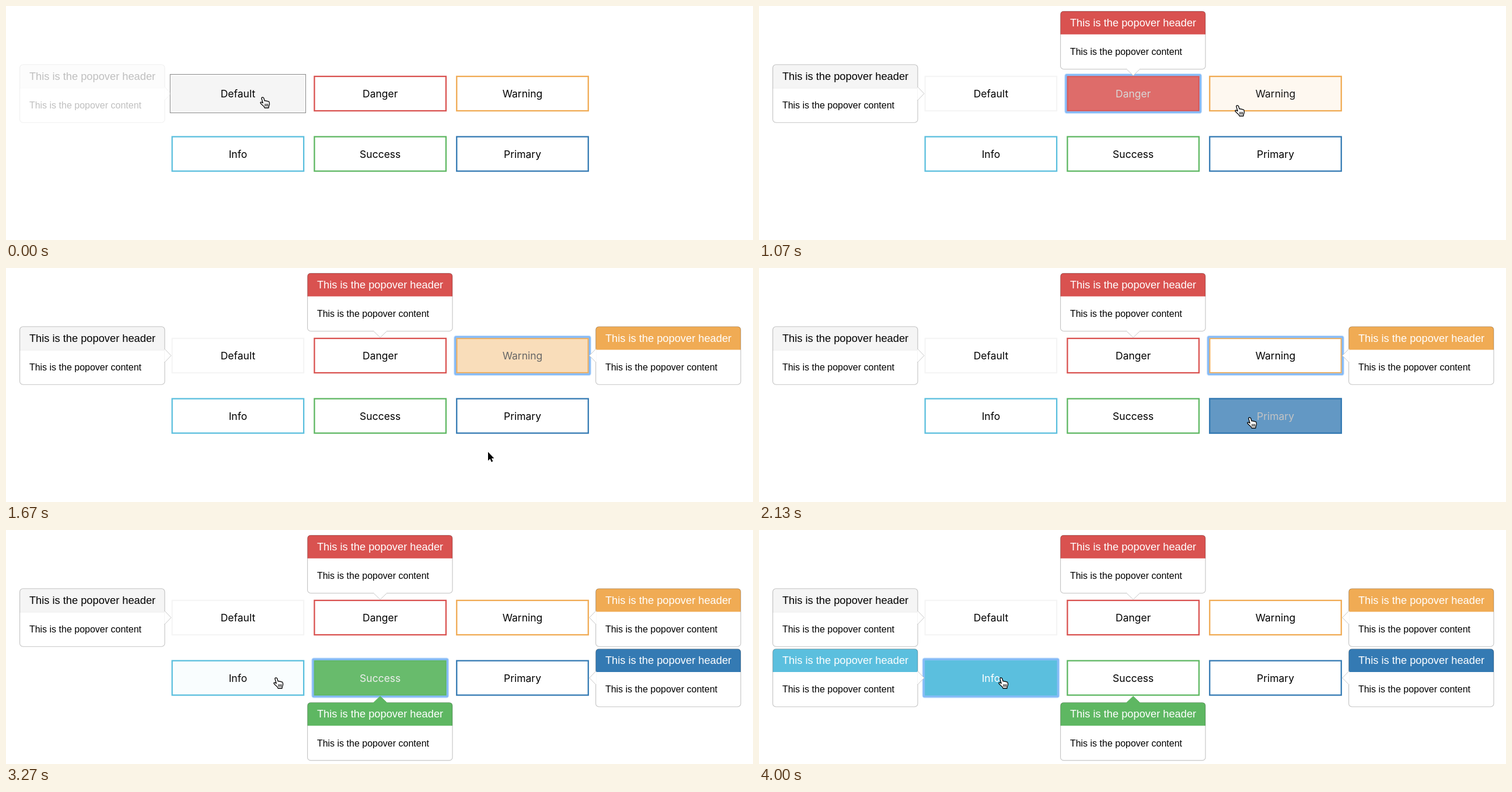
An HTML page that plays this animation: 1280x402 px, repeating every 4740 ms.

```html
<!DOCTYPE html>
<html lang="en">
<head>
<meta charset="utf-8">
<title>Popovers</title>
<style>
  html, body { margin: 0; width: 100%; height: 100%; overflow: hidden; background: #fff; }
  svg { display: block; width: 100%; height: 100%; }
  .label { font: 17.5px Inter, sans-serif; text-anchor: middle; }
  .head { font: 18.28px "Liberation Sans", Arial, sans-serif; }
  .body { font: 16px "Liberation Sans", Arial, sans-serif; }
</style>
</head>
<body>
<svg id="stage" viewBox="0 0 1280 402"></svg>
<script>
const LOOP = 4740, STEP = 1000 / 15, LAST_STEP = 60;
const W = 227.8, H = 61.4;      // button size
const PW = 248.4, PH = 99.4;    // popover size
const FADE = 7.5, POP_FADE = 2.25;

// Times are in steps: pointer enters, clicks, leaves. Listed in click order.
const buttons = [
  { name: 'Default', color: '#f5f5f5', col: 0, row: 0, side: 'left',   enter: -20,  click: -.56, leave: 3.7 },
  { name: 'Danger',  color: '#d95250', col: 1, row: 0, side: 'top',    enter: 4,    click: 10.5, leave: 15 },
  { name: 'Warning', color: '#f0ab54', col: 2, row: 0, side: 'right',  enter: 15.3, click: 19,   leave: 22.4 },
  { name: 'Primary', color: '#347ab3', col: 2, row: 1, side: 'right',  enter: 28.5, click: 34,   leave: 40.3 },
  { name: 'Success', color: '#5eb762', col: 1, row: 1, side: 'bottom', enter: 40.5, click: 43.5, leave: 48.4 },
  { name: 'Info',    color: '#5bbfde', col: 0, row: 1, side: 'left',   enter: 48.6, click: 52.5, leave: 99 }
];

// Pointer hot spot: step, x, y
const path = [
  [0, 440, 156], [2, 446, 156], [3.7, 511, 157], [4, 527, 157], [7, 596, 158], [9, 628, 159],
  [13.5, 640, 161], [15, 755, 166], [16, 820, 170], [18, 836, 160], [21, 834, 163],
  [22.4, 828, 181], [24, 826, 316], [26.5, 826, 316], [28.5, 832, 284], [31, 841, 256],
  [39, 841, 256], [40, 796, 258], [41, 665, 260], [42.5, 646, 261], [47, 644, 259],
  [48, 571, 255], [49, 463, 253], [51, 422, 253], [53, 415, 253], [60, 415, 253]
];

const clamp = v => Math.min(1, Math.max(0, v));

// CSS "ease": cubic-bezier(.25, .1, .25, 1)
function ease(x) {
  x = clamp(x);
  const bezier = (u, a, b) => 3 * u * (1 - u) * ((1 - u) * a + u * b) + u ** 3;
  let lo = 0, hi = 1;
  for (let i = 0; i < 20; i++) {
    const mid = (lo + hi) / 2;
    if (bezier(mid, .25, .25) < x) lo = mid; else hi = mid;
  }
  return bezier(lo, .1, 1);
}

function buttonMarkup({ x, y, name, color }) {
  return `<g class="button">
    <rect class="fill" x="${x}" y="${y}" width="${W}" height="${H}" fill="${color}"/>
    <rect x="${x + 1.15}" y="${y + 1.15}" width="${W - 2.3}" height="${H - 2.3}" fill="none" stroke="${color}" stroke-width="2.3"/>
    <text class="label" x="${x + W / 2}" y="${y + 37.3}">${name}</text>
  </g>`;
}

function popoverMarkup({ x, y, color, side, name }) {
  const cx = x + W / 2, cy = y + H / 2;
  const [px, py, angle] = {
    left:   [23.6, cy - 49.7, 0],
    right:  [1010.6, cy - 49.7, 180],
    top:    [cx - PW / 2 - .4, 9.1, 90],
    bottom: [cx - PW / 2 - .4, 296.5, -90]
  }[side];
  const tip = {
    left: [px + PW, cy], right: [px, cy], top: [cx, py + PH], bottom: [cx, py]
  }[side];
  const plain = name === 'Default', green = side === 'bottom';
  return `<g class="popover">
    <rect x="${px}" y="${py}" width="${PW}" height="${PH}" rx="5.5" fill="#fff"/>
    <path d="M${px} ${py + 39.7}v-34.2q0-5.5 5.5-5.5h${PW - 11}q5.5 0 5.5 5.5v34.2z" fill="${color}"/>
    ${plain ? `<path d="M${px} ${py + 40.2}h${PW}" stroke="#e9e9e9"/>` : ''}
    <rect x="${px}" y="${py}" width="${PW}" height="${PH}" rx="5.5" fill="none" stroke="#000" stroke-opacity=".23" stroke-width="1.14"/>
    <path transform="translate(${tip}) rotate(${angle})" d="M-.7 -11.4L0 -11.4L10.9 0L0 11.4L-.7 11.4" fill="${green ? color : '#fff'}" stroke="${green ? color : '#c8c8c8'}"/>
    <text class="head" x="${px + 16.3}" y="${py + 25.8}" fill="${plain ? '#000' : '#fff'}">This is the popover header</text>
    <text class="body" x="${px + 16.3}" y="${py + 75}">This is the popover content</text>
  </g>`;
}

for (const b of buttons) {
  b.x = 283.5 + 243.8 * b.col;
  b.y = 119.8 + 103.6 * b.row;
}

const stage = document.getElementById('stage');
stage.innerHTML = buttons.map(buttonMarkup).join('') + `
  <g id="ring" fill="none">
    <rect x="-1.6" y="-1.6" width="${W + 3.2}" height="${H + 3.2}" rx="2" stroke="#8fc0f8" stroke-opacity=".45" stroke-width="5"/>
    <rect x="-1.4" y="-1.4" width="${W + 2.8}" height="${H + 2.8}" rx="1.5" stroke="#83b9f7" stroke-width="2.8"/>
  </g>
  <rect id="outline" x="-2.2" y="-2.3" width="${W + 4.4}" height="${H + 4.6}" fill="none" stroke="#8c8c8c" stroke-width="1.1"/>` +
  buttons.map(popoverMarkup).join('') + `
  <g id="hand" stroke="#000" stroke-width="1.3" stroke-linejoin="round" stroke-linecap="round">
    <path fill="#fff" d="M-.8 1C.3 .6 1.3 1.2 1.7 2.3L3.2 7C4 6.3 5.4 6.5 5.8 7.4C6.7 6.8 8 7.1 8.4 8C9.6 7.6 10.9 8.2 11.2 9.4C11.8 11.5 11.6 14 10.4 16.2L10 19H3.2C2.6 17 .5 14.8 -1.4 13.4C-2.8 12.3 -4.2 11 -4.1 10C-3.9 8.8 -2.1 8.8 -.4 10.2L.2 10.6L-2 3C-2.3 2 -1.7 1.2 -.8 1Z"/>
    <path fill="none" stroke-width="1.1" d="M4 12.3v3.8M6.3 12.3v3.8M8.6 12.3v3.8"/>
  </g>
  <path id="arrow" d="M0 0V15L3.4 11.8L5.8 17.2L8.3 16.1L6 10.9H10.4Z" stroke="#fff" stroke-width="1.6" paint-order="stroke"/>`;

const $ = id => document.getElementById(id);
const ring = $('ring'), outline = $('outline'), hand = $('hand'), arrow = $('arrow');
const popovers = stage.querySelectorAll('.popover');
stage.querySelectorAll('.button').forEach((el, i) => {
  buttons[i].fill = el.querySelector('.fill');
  buttons[i].label = el.querySelector('.label');
});

const show = (el, on) => el.setAttribute('visibility', on ? 'visible' : 'hidden');
const move = (el, x, y) => el.setAttribute('transform', `translate(${x} ${y})`);

function pointerAt(k) {
  const i = Math.max(1, path.findIndex(p => p[0] >= k));
  const [k0, x0, y0] = path[i - 1], [k1, x1, y1] = path[i];
  const f = (k - k0) / (k1 - k0);
  return [x0 + (x1 - x0) * f, y0 + (y1 - y0) * f];
}

function draw(k) {
  buttons.forEach((b, i) => {
    const level = ease((k - b.enter) / FADE) - ease((k - b.leave) / FADE);
    const grey = i ? Math.round(255 * clamp(level)) : 0;
    b.fill.setAttribute('fill-opacity', clamp(level));
    b.label.setAttribute('fill', `rgb(${grey},${grey},${grey})`);
    popovers[i].setAttribute('opacity', clamp((k - b.click) / POP_FADE));
  });

  const focused = buttons.filter(b => b.click <= k).pop();
  const inactive = k < 3;
  for (const el of [ring, outline]) move(el, focused.x, focused.y);
  show(ring, !inactive);
  show(outline, inactive);

  const [x, y] = pointerAt(k);
  const over = buttons.some(b => x >= b.x && x <= b.x + W && y >= b.y && y <= b.y + H);
  for (const el of [hand, arrow]) move(el, x, y);
  show(hand, over);
  show(arrow, !over);
}

function tick() {
  const t = performance.now() % LOOP;
  draw(Math.min(LAST_STEP, Math.floor((t + 3.4) / STEP)));
  requestAnimationFrame(tick);
}
tick();
</script>
</body>
</html>
```
